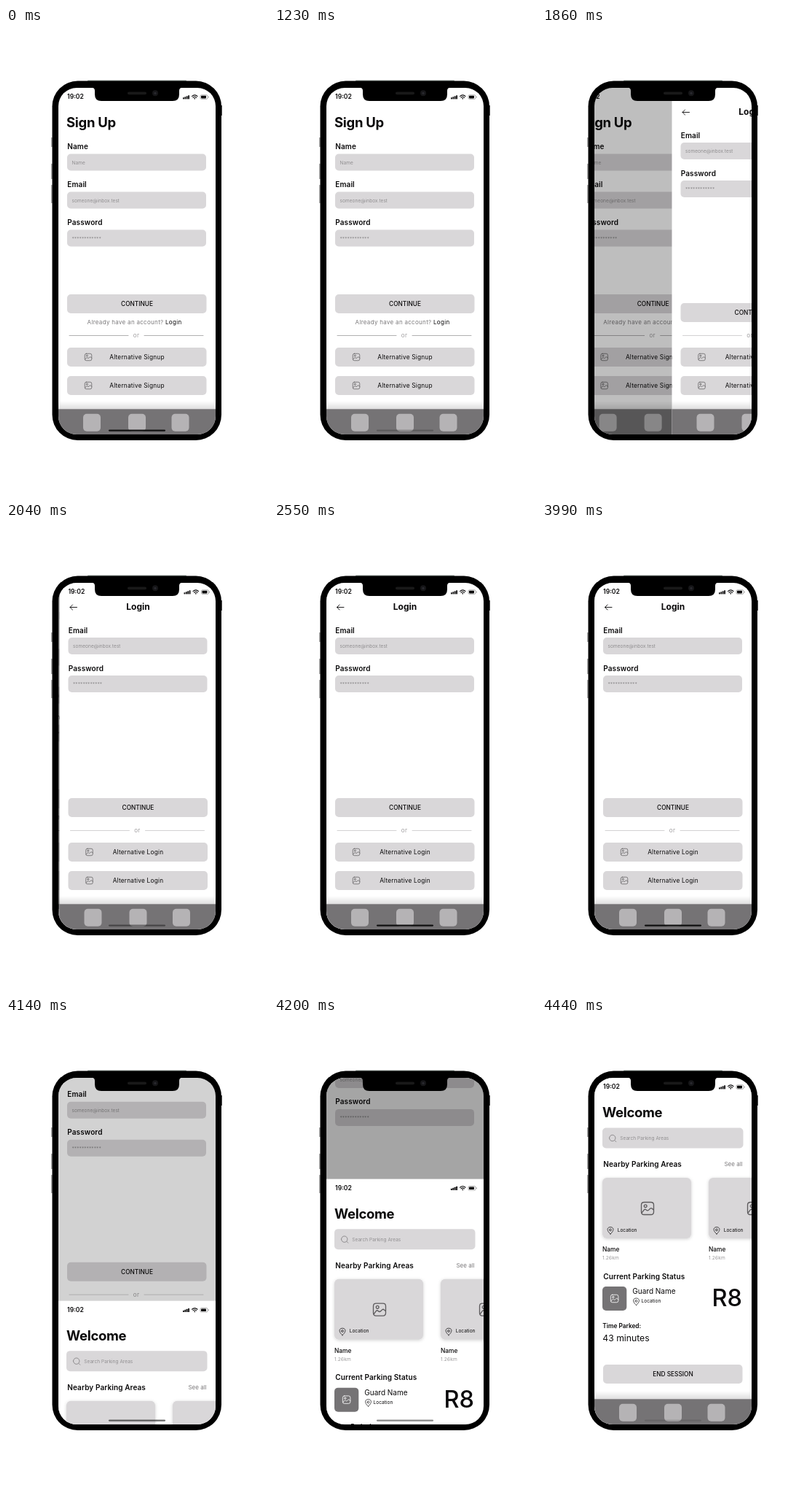
Write an HTML page that moves like this. It is 360x640 px and loops after 4.47 s.

```html
<!DOCTYPE html>
<html lang="en">
<head>
<meta charset="utf-8">
<title>Sign-up flow</title>
<style>
html, body { margin: 0; width: 100%; height: 100%; overflow: hidden; background: #fff; }
svg { display: block; width: 360px; height: 640px; font-family: Inter, Roboto, sans-serif; }
text { white-space: pre; }
</style>
</head>
<body>
<svg id="stage" viewBox="0 0 360 640"></svg>
<script>
const LOOP = 4470, WIDTH = 216, HEIGHT = 475;
const PANEL = '#d9d7d9', BAR = '#757375', GRAY = '#7b797b', INK = '#0b0a0b';

const rect = (x, y, w, h, r, fill, extra = '') =>
  `<rect x="${x}" y="${y}" width="${w}" height="${h}" rx="${r}" fill="${fill}" ${extra}/>`;
const path = (d, stroke = INK, width = 0.8) =>
  `<path d="${d}" fill="none" stroke="${stroke}" stroke-width="${width}" stroke-linecap="round" stroke-linejoin="round"/>`;
const text = (s, x, y, size, { weight = 400, fill = INK, anchor = 'start', spacing = 0 } = {}) =>
  `<text x="${x}" y="${y}" font-size="${size}" font-weight="${weight}" fill="${fill}" text-anchor="${anchor}" letter-spacing="${spacing}">${s}</text>`;

const title = s => text(s, 83, 136, 18.5, { weight: 700, spacing: -0.3 });
const heading = (s, y) => text(s, 84.3, y, 10, { weight: 600, spacing: 0.1 });
const placeholder = (s, x, y) => text(s, x, y, 6.5, { weight: 300, fill: GRAY, spacing: 0.1 });

const field = (label, hint, y, hintY = 186.5) =>
  heading(label, y + 166) + rect(84, y + 172.5, 191, 23, 5, PANEL) + placeholder(hint, 90.5, y + hintY);

const button = (label, y, spacing = 0) =>
  rect(84, y, 191.5, 26, 5, PANEL) +
  text(label, 180, y + 16, 8.3, { anchor: 'middle', weight: spacing ? 400 : 500, spacing });

const picture = (cx, cy, size, stroke) =>
  `<g transform="translate(${cx} ${cy}) scale(${size / 18})">` +
  path('M-5 -9H5Q9 -9 9 -5V5Q9 9 5 9H-5Q-9 9 -9 5V-5Q-9 -9 -5 -9Z' +
    'M-8 6L-5 2Q-3.5 .5 -2 2Q0 4 2 2L4 0Q5.500 -1 7 .5L9 2.500' +
    'M-5 -3.500a2 2 0 1 0 4 0a2 2 0 1 0 -4 0', stroke, 1.4) + '</g>';

const pin = (x, y) =>
  path(`M${x} ${y + 5}C${x - 6} ${y} ${x - 4.500} ${y - 4.500} ${x} ${y - 4.500}S${x + 6} ${y} ${x} ${y + 5}Z` +
    `M${x - 1.4} ${y - 0.6}a1.4 1.4 0 1 0 2.8 0a1.4 1.4 0 1 0 -2.8 0`, INK, 0.7);

const place = (x, y, gap) => pin(x, y) + text('Location', x + gap, y + 1.7, 6.6);

const divider = color =>
  path('M87 421.500H168M190 421.500H271', color, 0.9) +
  text('or', 179, 424, 8, { anchor: 'middle', fill: '#a09ea0', spacing: 0.3 });

const alternatives = label => [438, 477].map(y =>
  button(label, y, 0.2) + picture(113, y + 13, 9.5, '#5d5b5d')).join('');

const status = text('19:02', 84, 97, 8.6, { weight: 600 }) +
  [0, 1, 2, 3].map(i => rect(243 + i * 2.4, 95.2 - i, 1.8, 2.2 + i, 0.4, INK)).join('') +
  path('M255.500 93.600Q259.300 90.200 263.100 93.600M257 95.300Q259.300 93.300 261.600 95.300', INK, 1.1) +
  `<circle cx="259.3" cy="96.7" r=".9" fill="${INK}"/>` +
  rect(267, 91.8, 10, 5.6, 1.5, 'none', 'stroke="#777" stroke-width=".6"') +
  rect(268, 92.8, 7, 3.6, 0.8, INK) + rect(277.8, 93.7, 0.8, 1.8, 0.4, '#777');

const tabs = rect(72, 511, 216, 12, 0, 'url(#fade)') + rect(72, 522.3, 216, 36, 0, BAR) +
  [106, 168, 227.5].map(x => rect(x, 528.7, 24, 24, 5, '#b5b3b5')).join('');

const card = x => rect(x, 219, 122, 83, 6, PANEL, 'filter="url(#soft)"') +
  picture(x + 62, 261, 17, '#5d5b5d') + place(x + 11, 291, 9.7) +
  text('Name', x, 320.3, 8.4, { weight: 500 }) +
  text('1.26km', x, 331, 6.6, { weight: 300, fill: GRAY, spacing: 0.2 });

const stars = '*'.repeat(12);
const email = 'someone@inbox.test';

const signUp = title('Sign Up') +
  field('Name', 'Name', 0) + field('Email', email, 52) + field('Password', stars, 104) +
  button('CONTINUE', 365) +
  text(`Already have an account? <tspan fill="${INK}">Login</tspan>`, 176.5, 406, 8,
    { anchor: 'middle', fill: GRAY, spacing: 0.3 }) +
  divider('#a9a7a9') + alternatives('Alternative Signup');

const login = path('M96 115.500H86.500M90 112L86.500 115.500L90 119', INK, 0.9) +
  text('Login', 180, 119.3, 12, { weight: 700, anchor: 'middle' }) +
  field('Email', email, -15.5) + field('Password', stars, 36.5) +
  button('CONTINUE', 377) + divider('#cfcdcf') + alternatives('Alternative Login');

const welcome = title('Welcome') +
  rect(83, 150.5, 193.5, 28, 5, PANEL) +
  path('M92.500 164.500a4.200 4.200 0 1 0 8.400 0a4.200 4.200 0 1 0 -8.400 0M100 167.800L101.800 169.600', GRAY) +
  placeholder('Search Parking Areas', 107.3, 167) +
  heading('Nearby Parking Areas', 204.3) +
  text('See all', 275.5, 203, 8, { anchor: 'end', fill: GRAY }) +
  card(83) + card(229) +
  heading('Current Parking Status', 357.5) +
  rect(83, 368, 33.3, 33, 5, BAR) + picture(99.6, 384.5, 10.5, '#fff') +
  text('Guard Name', 124.3, 378, 10) + place(129.5, 388.5, 7) +
  text('R8', 275, 395, 32.5, { weight: 500, anchor: 'end' }) +
  text('Time Parked:', 83.3, 424.5, 8.3, { weight: 600 }) +
  text('43 minutes', 83.3, 443.3, 12.2) +
  button('END SESSION', 475);

const screen = (id, content) => `<g id="${id}">` + rect(72, 82, WIDTH, HEIGHT, 0, '#fff') +
  content + status + tabs + rect(72, 82, WIDTH, HEIGHT, 0, '#000', 'class="dim" opacity="0"') + '</g>';

const stage = document.getElementById('stage');
stage.innerHTML = `
<defs>
  <linearGradient id="fade" x2="0" y2="1"><stop stop-opacity="0"/><stop offset="1" stop-opacity=".14"/></linearGradient>
  <filter id="soft" x="-20%" y="-20%" width="140%" height="140%">
    <feDropShadow dx="0" dy="1" stdDeviation="2" flood-opacity=".18"/></filter>
  <clipPath id="glass">${rect(72, 82, WIDTH, HEIGHT, 25, '#000')}</clipPath>
</defs>` +
  rect(112, 71.5, 136, 2, 1, '#8f9b95') +
  [[150, 13], [186, 21], [215, 25]].map(([y, h]) => rect(62.2, y, 1.5, h, 0.5, '#8d8d8d')).join('') +
  rect(63.5, 72.5, 232.5, 492.5, 35, '#000') +
  rect(290, 106, 6.7, 14, 0.5, '#000') +
  `<g clip-path="url(#glass)">${screen('signUp', signUp)}${screen('login', login)}${screen('welcome', welcome)}` +
  rect(141, 550.4, 78, 2.4, 1.2, '#111', 'id="home"') + '</g>' +
  '<path d="M118 81.500Q122 82 122 86V91Q122 100 131 100H229Q238 100 238 91V86Q238 82 242 81.500Z"/>' +
  rect(167, 87.6, 26, 3.6, 1.8, '#191919') +
  '<circle cx="205" cy="89.300" r="4" fill="#161618"/><circle cx="205" cy="89.300" r="1.600" fill="#2a2a30"/>';

const progress = (t, start, length) => Math.min(1, Math.max(0, (t - start) / length));
const slide = (t, start) => 1 - (1 - progress(t, start, 300)) ** 3;
const hide = (t, start) => (1 - progress(t, start, 720)) ** 2;

const parts = Object.fromEntries(['signUp', 'login', 'welcome', 'home'].map(id => [id, document.getElementById(id)]));
function pose(id, x, y, dim = 0) {
  parts[id].setAttribute('transform', `translate(${x} ${y})`);
  parts[id].querySelector('.dim').setAttribute('opacity', dim);
}

function draw() {
  const t = performance.now() % LOOP;
  const push = slide(t, 1798), rise = slide(t, 4100);
  // The covered screen moves a quarter as far and darkens.
  pose('signUp', -WIDTH / 4 * push, 0, push / 2);
  pose('login', WIDTH * (1 - push), -HEIGHT / 4 * rise, rise / 2);
  pose('welcome', 0, HEIGHT * (1 - rise));
  const home = t < 1860 ? hide(t, 870) : progress(t, 1860, 400) * hide(t, 3990);
  parts.home.setAttribute('opacity', home);
  requestAnimationFrame(draw);
}
draw();
</script>
</body>
</html>
```
